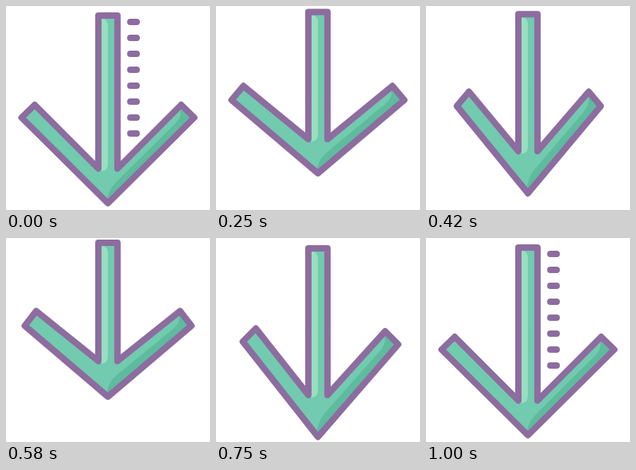
Write an HTML page that moves like this. It is 256 px wide and 256 px high and loops after 1.18 s.

```html
<!DOCTYPE html>
<html lang="en">
<head>
<meta charset="utf-8">
<title>Down arrow</title>
<style>
  html, body { margin: 0; width: 100%; height: 100%; overflow: hidden; background: #fff; }
  svg { display: block; width: 100%; height: 100%; }
</style>
</head>
<body>
<svg viewBox="0 0 256 256">
  <path id="body" fill="#72caaf"/>
  <path id="light" fill="#97dfc0"/>
  <path id="shade" fill="#5ebb9e"/>
  <g fill="none" stroke="#8d6c9f" stroke-width="8" stroke-linecap="round" stroke-linejoin="round">
    <path id="outline"/>
    <path id="dashes"/>
  </g>
</svg>
<script>
const LOOP = 1180, FPS = 24, CENTER = 127.9, HALF = 12;

// Pose: shaft top, inner corner, tip, left arm outer end (x, y), inner end (x, y),
// offset of the right arm from the mirrored left one (x, y)
const rest   = [12, 204, 247.5, 19.5, 140, 36, 124, 0, 0];
const raised = [5, 147, 189.5, 19.5, 106, 33.5, 87.5, 0, 0];
const folded = [12, 194.5, 251, 45.5, 132.5, 61, 114.5, 3, 0];
const landed = [13, 197, 249.6, 33.6, 130, 50, 113.5, 6.5, 3.5];
const settle = [7, 185, 231, 19.5, 139.5, 36, 123.5, 0, 0];
const keys = [[3, rest], [8, raised], [11, folded], [15, raised], [18, landed], [21, settle], [24, rest]];

const part = id => document.getElementById(id);
const set = (id, d) => part(id).setAttribute('d', d);
const clamp = v => Math.min(1, Math.max(0, v));
const ease = v => { v = clamp(v); return v * v * (3 - 2 * v); };
const mix = (a, b, k) => a.map((v, i) => v + (b[i] - v) * k);
const str = p => p.map(v => v.toFixed(2)).join(' ');

function poseAt(frame) {
  let i = 0;
  while (i < keys.length - 2 && frame >= keys[i + 1][0]) i++;
  const [[start, from], [end, to]] = [keys[i], keys[i + 1]];
  return mix(from, to, ease((frame - start) / (end - start)));
}

function drawArrow([top, inner, tipY, ax, ay, bx, by, dx, dy]) {
  const left = CENTER - HALF, right = CENTER + HALF;
  const toRight = (x, y) => [2 * CENTER - x + dx, y + dy];
  const tip = [CENTER, tipY];
  const outerEnd = toRight(ax, ay), innerEnd = toRight(bx, by);
  const d = 'M' + [[left, top], [right, top], [right, inner], innerEnd, outerEnd,
    tip, [ax, ay], [bx, by], [left, inner]].map(str).join('L') + 'Z';
  set('body', d);
  set('outline', d);

  set('light', `M${left} ${top + 4}H${left + 4}Q${CENTER} ${top + 4} ${CENTER} ${top + 13}` +
    `V${inner - 6}Q${CENTER} ${inner + 3} ${left + 4} ${inner + 3}L${left} ${inner}Z`);

  // The shade covers the lower half of the right arm, bounded by its centre line
  const slope = (inner - innerEnd[1]) / (innerEnd[0] - right);
  const foot = [CENTER - .5, (inner + HALF * slope + tipY) / 2];
  const head = mix(outerEnd, innerEnd, .5);
  const along = k => mix(head, foot, k);
  const corner = mix(innerEnd, [right, inner], .04);
  set('shade', `M${str(innerEnd)}L${str(corner)}Q${str(along(.04))} ${str(along(.17))}` +
    `L${str(along(.9))}Q${str(foot)} ${str([CENTER - 2, tipY])}L${str(tip)}L${str(outerEnd)}Z`);
}

function drawDashes(frame) {
  const visible = frame < 6 || frame >= 21;
  const spread = frame < 6 ? 1 - ease((frame - 3) / 3) : ease((frame - 21) / 3);
  let d = '';
  for (let i = 0; visible && i < 8; i++) d += `M156 ${20 + 20 * i * spread}h8`;
  set('dashes', d);
}

// Poses change in whole steps; the small lead absorbs times rounded to 10 ms
function render(ms) {
  const frame = Math.floor((ms % LOOP) * FPS / 1000 + .12);
  drawArrow(poseAt(frame));
  drawDashes(frame);
}

const start = performance.now();
function tick() {
  render(performance.now() - start);
  requestAnimationFrame(tick);
}
tick();
</script>
</body>
</html>
```
